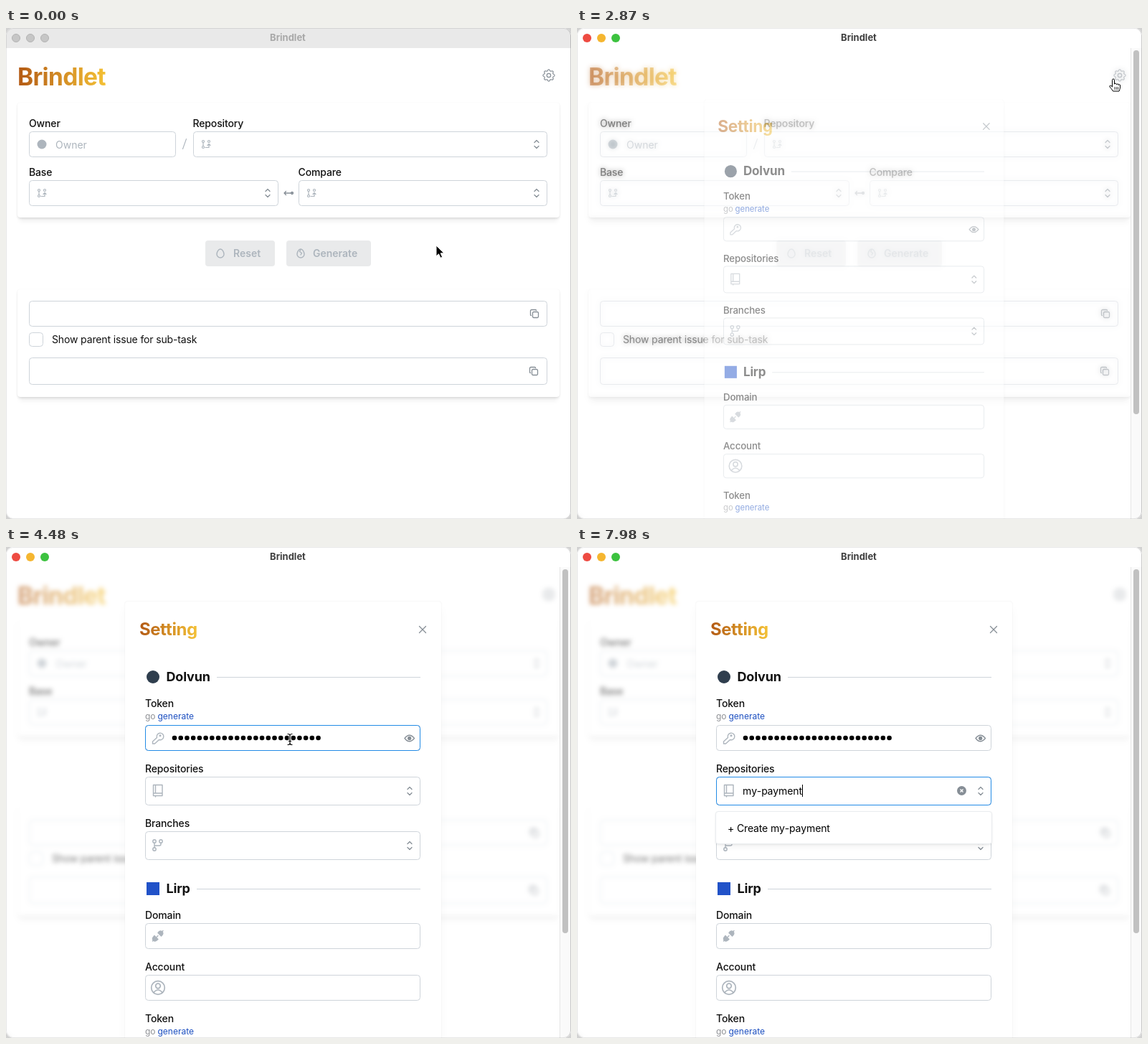
Recreate the animation shown at these times as an HTML page. Size 788 px wide and 684 px high, loop 8000 ms.

```html
<!DOCTYPE html>
<html lang="en">
<head>
<meta charset="utf-8">
<title>Brindlet</title>
<style>
@property --t { syntax: "<number>"; inherits: true; initial-value: 0; }
@keyframes clock { to { --t: 8000; } }
@keyframes fade { 0%, 35% { opacity: 0; animation-timing-function: ease; } 38.125%, 100% { opacity: 1; } }
@keyframes pop { 0%, 35% { transform: scale(.9); animation-timing-function: ease; } 38.125%, 100% { transform: none; } }
@keyframes pointer {
  0%, 9.6% { transform: translate(600px, 303px); }
  19.25% { transform: translate(592px, 128px); }
  25.75% { transform: translate(593px, 124px); }
  33%, 38.25% { transform: translate(749px, 71px); }
  42.9% { transform: translate(364px, 312px); }
  47.25%, 49% { transform: translate(383px, 283px); }
  51%, 56.25% { transform: translate(396px, 268px); }
  59.5%, 100% { transform: translate(398px, 342px); }
}
html, body { margin: 0; width: 100%; height: 100%; overflow: hidden; background: #d2d2d2; }
body { animation: clock 8s linear infinite; font: 14px Inter, "Liberation Sans", sans-serif; }
#win { position: absolute; left: 0; top: 0; width: 788px; height: 684px; border-radius: 10px; overflow: hidden; background: #fff; }
#win > *, #modal > * { position: absolute; }
svg { left: 0; top: 0; width: 788px; height: 684px; }
/* visible while --a < --t < --b */
.on { --b: 9000; opacity: clamp(0, min(var(--t) - var(--a), var(--b) - var(--t)), 1); }

.card { left: 16px; width: 756px; border-radius: 4px; background: #fff;
  box-shadow: 0 0 2px rgba(0,0,0,.05), 0 2px 3px rgba(0,0,0,.09), 0 9px 6px -3px rgba(0,0,0,.05); }
text { fill: #111; letter-spacing: -.01em; }
.label { font-weight: 500; }
.small { font-size: 12px; letter-spacing: 0; }
.hint { fill: #adb5bd; }
.btn { font-weight: 600; fill: #adb5bd; letter-spacing: 0; }
.head { font-size: 18px; font-weight: 700; }
.big { font-weight: 700; letter-spacing: -.02em; fill: url(#gold); }
.bar { font-size: 13px; font-weight: 700; letter-spacing: 0; text-anchor: middle; }
.field { fill: #fff; stroke: #ced4da; }
.focus { fill: none; stroke: #228be6; }
.ico { fill: none; stroke: #adb5bd; stroke-width: 1.4; stroke-linecap: round; stroke-linejoin: round; }
.dark { stroke: #868e96; stroke-width: 1.3; }

#veil { inset: 28px 0 0; background: rgba(255,255,255,.42); backdrop-filter: blur(3px); animation: fade 8s linear infinite; }
#modal { left: 0; top: 0; width: 788px; height: 684px; transform-origin: 386px 540px;
  animation: fade 8s linear infinite, pop 8s linear infinite; }
#panel { left: 166px; top: 76px; width: 441px; height: 930px; border-radius: 4px; background: #fff;
  box-shadow: 0 0 2px rgba(0,0,0,.1), 0 10px 10px -5px rgba(0,0,0,.04), 0 8px 14px rgba(0,0,0,.03); }
#menu { left: 193px; top: 368px; width: 384px; height: 44px; border: 1px solid #e9ecef; border-radius: 4px; background: #fff;
  box-shadow: 0 1px 3px rgba(0,0,0,.07), 0 8px 10px -5px rgba(0,0,0,.05); }
.typed { display: flex; height: 20px; line-height: 20px; white-space: pre; letter-spacing: -.01em; color: #000; }
.typed i { font-style: normal; overflow: hidden; max-width: clamp(0px, (var(--t) - var(--a)) * 20px, 20px); }
.typed b { width: 1.3px; height: 17px; margin-top: 1px; background: #000; }
#pointer { animation: pointer 8s ease-in-out infinite; }
#edge { inset: 0; border-radius: 10px; box-shadow: inset 0 0 0 1px rgba(0,0,0,.09), inset -1px 0 rgba(0,0,0,.12); }
</style>
</head>
<body>
<svg width="0" height="0" style="position:absolute;width:0;height:0">
  <defs>
    <linearGradient id="gold"><stop stop-color="#b35a14"/><stop offset="1" stop-color="#f4c136"/></linearGradient>
    <g id="updown"><path d="M-3-2.5 0-5.5 3-2.5M-3 2.5 0 5.5 3 2.5"/></g>
    <g id="merge" stroke-width="1.2"><circle cx="-4" cy="-4" r="1.5"/><circle cx="-4" cy="4" r="1.5"/><circle cx="4" cy="-4" r="1.5"/><path d="M-4-2.5V2.5M-1 4.5H4V-.5M2 1.5 4-.5 6 1.5"/></g>
    <g id="copy"><rect x="-2.5" y="-2.5" width="8" height="8" rx="1.5"/><path d="M-4.5 2.5a1 1 0 0 1-1-1v-5.5a1.5 1.5 0 0 1 1.500-1.500h5.500a1 1 0 0 1 1 1"/></g>
    <path id="egg" d="M0-6C3-6 5-1.500 5 1.200A5 4.800 0 0 1-5 1.200C-5-1.500-3-6 0-6Z"/>
    <path id="arrow" d="M0 0V15L3.500 11.800 6 17.300 8.600 16.200 6.200 10.800H11Z" fill="#000" stroke="#fff" stroke-linejoin="round"/>
  </defs>
</svg>

<div id="win">
  <div class="card" style="top:104px;height:160px"></div>
  <div class="card" style="top:364px;height:150px"></div>
  <svg>
    <text class="big" x="16" y="79.500" font-size="33.500">Brindlet</text>
    <g class="ico dark" transform="translate(746.200 55.200) scale(.9)"><path d="M10.325 4.317c.426-1.756 2.924-1.756 3.350 0a1.724 1.724 0 0 0 2.573 1.066c1.543-.94 3.310.826 2.370 2.370a1.724 1.724 0 0 0 1.065 2.572c1.756.426 1.756 2.924 0 3.350a1.724 1.724 0 0 0-1.066 2.573c.94 1.543-.826 3.310-2.370 2.370a1.724 1.724 0 0 0-2.572 1.065c-.426 1.756-2.924 1.756-3.350 0a1.724 1.724 0 0 0-2.573-1.066c-1.543.94-3.310-.826-2.370-2.370a1.724 1.724 0 0 0-1.065-2.572c-1.756-.426-1.756-2.924 0-3.350a1.724 1.724 0 0 0 1.066-2.573c-.94-1.543.826-3.310 2.370-2.370 1 .608 2.296.07 2.572-1.065z"/><circle cx="12" cy="12" r="3"/></g>

    <g class="label">
      <text x="32" y="138">Owner</text><text x="260.500" y="138">Repository</text>
      <text x="32" y="206">Base</text><text x="407.500" y="206">Compare</text>
    </g>
    <g class="field">
      <rect x="32.500" y="144.500" width="204" height="35" rx="4"/><rect x="261.500" y="144.500" width="493" height="35" rx="4"/>
      <rect x="32.500" y="212.500" width="347" height="35" rx="4"/><rect x="408.500" y="212.500" width="346" height="35" rx="4"/>
      <rect x="32.500" y="380.500" width="722" height="35" rx="4"/><rect x="32.500" y="459.500" width="722" height="37" rx="4"/>
      <rect x="32.500" y="424.500" width="19" height="19" rx="4"/>
    </g>
    <circle cx="50" cy="162" r="6.500" fill="#adb5bd"/>
    <text class="hint" x="69" y="168" style="letter-spacing:0">Owner</text>
    <g class="ico">
      <use href="#merge" x="279" y="162"/><use href="#merge" x="50" y="230"/><use href="#merge" x="426" y="230"/>
      <path d="M246.500 168.500 251.500 154.500" stroke-width="1.1"/>
      <use href="#egg" x="299" y="314"/>
    </g>
    <g class="ico dark">
      <use href="#updown" x="740" y="162"/><use href="#updown" x="365" y="230"/><use href="#updown" x="740" y="230"/>
      <path d="M388 230H400M390.500 227.500 388 230 390.500 232.500"/><circle cx="399" cy="230" r="1.500"/>
      <use href="#copy" x="737" y="398"/><use href="#copy" x="736" y="478"/>
    </g>
    <g fill="#e9eaeb"><rect x="278" y="296" width="97" height="36" rx="4"/><rect x="391" y="296" width="118" height="36" rx="4"/></g>
    <g class="ico"><use href="#egg" x="299" y="314"/><use href="#egg" x="411" y="314"/><path d="M411 308.500 409.500 311.500 412.500 313.500 411 316"/></g>
    <text class="btn" x="317" y="319">Reset</text><text class="btn" x="428" y="319">Generate</text>
    <text x="64" y="439">Show parent issue for sub-task</text>
  </svg>

  <div id="veil"></div>

  <div id="modal">
    <div id="panel"></div>
    <svg>
      <text class="big" x="186" y="123" font-size="24">Setting</text>
      <path class="ico dark" d="M576.500 110.500 585.500 119.500M585.500 110.500 576.500 119.500"/>
      <circle cx="205" cy="181" r="9" fill="#2f3e4e"/><rect x="196" y="467" width="18" height="18" fill="#2152c8"/>
      <text class="head" x="223.500" y="187">Dolvun</text><text class="head" x="223.500" y="482">Lirp</text>
      <path d="M294 181.500H578M266 476.500H578" stroke="#ced4da"/>
      <g class="label">
        <text x="194" y="223">Token</text><text x="194" y="314">Repositories</text><text x="194" y="390">Branches</text>
        <text x="194" y="518">Domain</text><text x="194" y="590">Account</text><text x="194" y="662">Token</text>
      </g>
      <text class="small" x="194" y="240" style="fill:#909296">go <tspan x="211.500" fill="#1c4fc0">generate</tspan></text>
      <text class="small" x="194" y="679" style="fill:#909296">go <tspan x="211.500" fill="#1c4fc0">generate</tspan></text>
      <g class="field">
        <rect x="194.500" y="248.500" width="383" height="35" rx="4"/><rect x="194.500" y="320.500" width="383" height="39" rx="4"/>
        <rect x="194.500" y="396.500" width="383" height="39" rx="4"/><rect x="194.500" y="524.500" width="383" height="35" rx="4"/>
        <rect x="194.500" y="596.500" width="383" height="35" rx="4"/><rect x="194.500" y="688.500" width="383" height="35" rx="4"/>
      </g>
      <g class="ico">
        <path d="M210.500 265.500A4.800 4.800 0 1 1 213.500 268.500L207.500 274H204.500V271Z"/><circle cx="215" cy="262.800" r=".8"/>
        <path d="M205.500 331.500H218V346.500H205.500ZM205.500 343H218M208.500 331.500V343M208.500 346.500V348"/>
        <circle cx="207" cy="410" r="2.200"/><circle cx="207" cy="421" r="2.200"/><circle cx="216" cy="410" r="2.200"/><path d="M207 412.500V418.500M216 412.500V414A2 2 0 0 1 214 416H207"/>
        <path d="M204.500 549 207 546.500M216.500 537 219 534.500"/>
        <path d="M207 541.500 212 546.500 209.500 548.500A3.300 3.300 0 0 1 205 544ZM212 537.500 216.500 542 218.300 540A3.300 3.300 0 0 0 213.800 535.500ZM210.500 543 212 541.500" fill="#adb5bd"/>
        <circle cx="212" cy="614" r="9.300" stroke-width="1.700"/><circle cx="212" cy="611.500" r="3.300" stroke-width="1.700"/><path d="M206 620.500Q212 613.500 218 620.500" stroke-width="1.700"/>
      </g>
      <g class="ico dark">
        <path d="M556 266.500Q562.500 258 569.500 266.500Q562.500 275 556 266.500Z"/><circle cx="562.700" cy="266.500" r="2" fill="#868e96"/>
        <use href="#updown" x="563" y="340"/><use href="#updown" x="563" y="416"/>
      </g>
      <rect class="focus on" style="--a:4150;--b:4830" x="194.500" y="248.500" width="383" height="35" rx="4"/>
      <rect class="focus on" style="--a:4830" x="194.500" y="320.500" width="383" height="39" rx="4"/>
      <path class="on" style="--a:4420" d="M235 266H436" stroke="#000" stroke-width="6.600" stroke-linecap="round" stroke-dasharray="0 8.720"/>
      <path class="on" style="--a:4150;--b:4420" d="M231.500 258V274" stroke="#000" stroke-width="1.300"/>
      <g class="on" style="--a:5950"><circle cx="536.500" cy="339.500" r="6.500" fill="#868e96"/><path d="M534.500 337.500 538.500 341.500M538.500 337.500 534.500 341.500" stroke="#fff" stroke-width="1.400"/></g>
    </svg>
    <div class="typed on" style="--a:4830;left:231px;top:330px"><span class="word"></span><b></b></div>
    <div id="menu" class="on" style="--a:5950"></div>
    <div class="typed on" style="--a:5950;left:210px;top:382px">+ Create <span class="word"></span></div>
  </div>

  <svg>
    <g class="on" style="--a:2800"><path d="M772 28H788V684H772Z" fill="#fafafa"/><path d="M772.500 28V684" stroke="#e6e6e6"/><rect x="776" y="31" width="8" height="507" rx="4" fill="#c1c1c1"/></g>
    <g class="on" style="--a:1250">
      <path d="M0 0H788V28H0Z" fill="#fff"/>
      <circle cx="14" cy="14" r="6" fill="#ee4b42"/><circle cx="34" cy="14" r="6" fill="#f5b630"/><circle cx="54" cy="14" r="6" fill="#3cc23f"/>
      <text class="bar" x="393" y="18" style="fill:#3f3f3f">Brindlet</text>
    </g>
    <g class="on" style="--a:-9;--b:1250">
      <path d="M0 0H788V28H0Z" fill="#e9e9e9"/>
      <g fill="#c6c6c6" stroke="#b3b3b3"><circle cx="14" cy="14" r="5.500"/><circle cx="34" cy="14" r="5.500"/><circle cx="54" cy="14" r="5.500"/></g>
      <text class="bar" x="393" y="18" style="fill:#a8a8a8">Brindlet</text>
    </g>
    <g id="pointer">
      <use class="on" style="--a:-9;--b:2620" href="#arrow"/>
      <use class="on" style="--a:3090;--b:4010" href="#arrow"/>
      <g class="on" style="--a:2620;--b:3090" stroke="#000" stroke-linejoin="round" stroke-linecap="round">
        <path d="M-2.500 10V1.500A1.500 1.500 0 0 1 .5 1.500V6Q2-.0 0 0M-2.500 1.500A1.500 1.500 0 0 1 .5 1.500V6.500Q2 4.800 3.500 7Q5 5.500 6 7.500Q8.500 6.500 8.500 9V12Q8 15 7 17H-1.500Q-3.500 13.500-6 11Q-6.500 8-3.800 9.500L-2.500 10.500Z" fill="#fff" stroke="none"/>
        <path d="M-2.500 10.800V1.500A1.500 1.500 0 0 1 .5 1.500V7Q2 4.800 3.500 7V8Q5 5.500 6 7.500V8.500Q8.500 6.500 8.500 9V12Q8 15 7 17H-1.500Q-3.500 13.500-6 11Q-6.500 8-3.800 9.500Z" fill="#fff"/>
        <path d="M1 11.500V14.500M3.300 11.500V14.500M5.500 11.500V14.500" stroke-width=".8"/>
      </g>
      <g class="on" style="--a:4010;--b:5950" fill="none" stroke-linecap="round">
        <path d="M-3-7.500Q0-7.500 0-5.500Q0-7.500 3-7.500M0-5.500V5.500M-3 7.500Q0 7.500 0 5.500Q0 7.500 3 7.500M-1.500 2.500H1.500" stroke="#fff" stroke-width="3"/>
        <path d="M-3-7.500Q0-7.500 0-5.500Q0-7.500 3-7.500M0-5.500V5.500M-3 7.500Q0 7.500 0 5.500Q0 7.500 3 7.500M-1.500 2.500H1.500" stroke="#000" stroke-width="1.200"/>
      </g>
    </g>
  </svg>
  <div id="edge"></div>
</div>
<script>
const word = "my-payment";
const firstKey = 5950, gap = 205;
for (const slot of document.querySelectorAll(".word")) {
  slot.style.display = "flex";
  [...word].forEach((ch, n) => {
    const key = document.createElement("i");
    key.textContent = ch;
    key.style.setProperty("--a", firstKey + n * gap);
    slot.append(key);
  });
}
</script>
</body>
</html>
```
